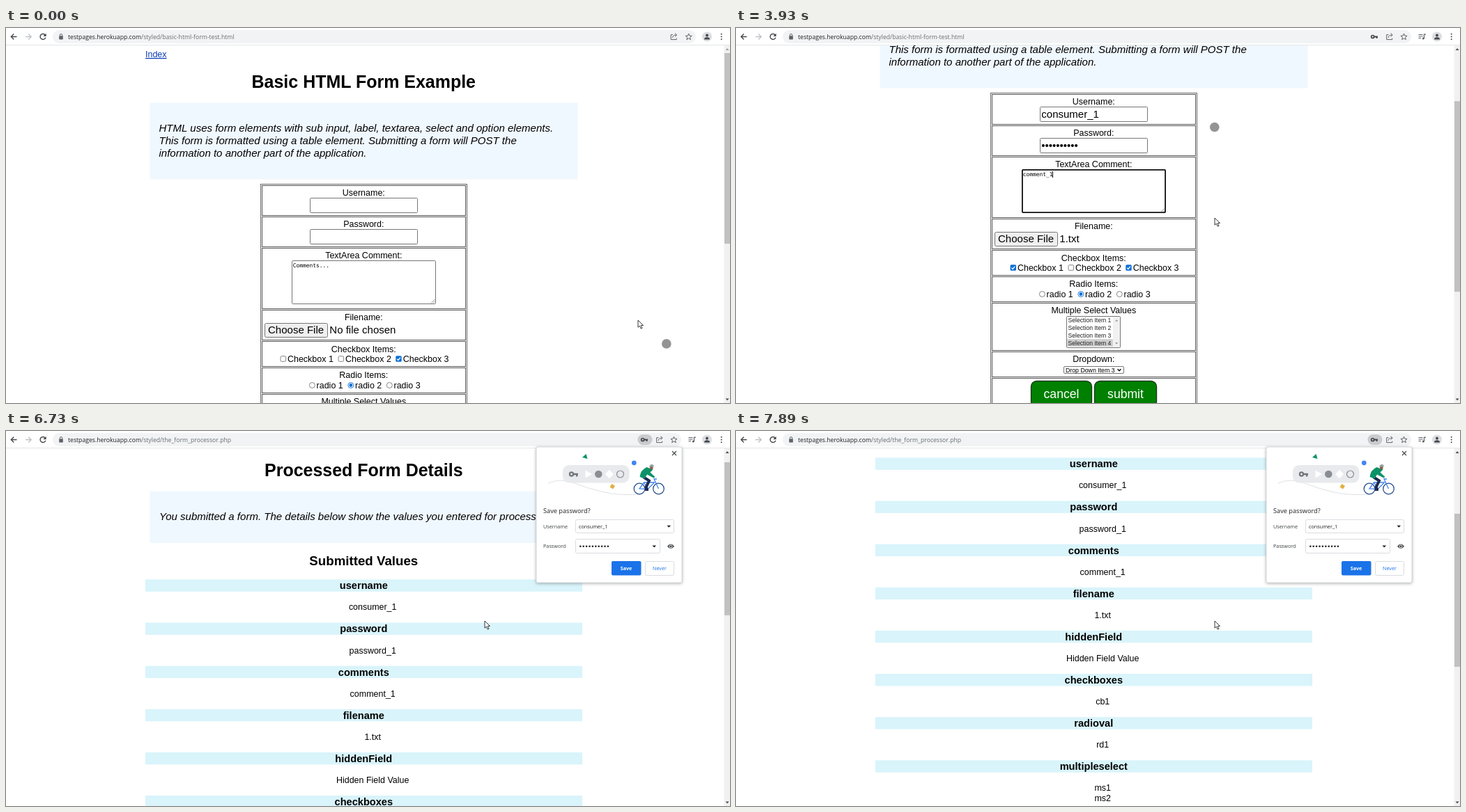
Animation, 1039 px wide and 539 px high, one loop 8 s. Source, as an HTML page:

```html
<!DOCTYPE html>
<html lang="en">
<head>
<meta charset="utf-8">
<title>Form demo</title>
<style>
  html, body { margin: 0; width: 100%; height: 100%; overflow: hidden; background: #fff; }
  svg { display: block; font-family: "Liberation Sans", Arial, sans-serif; }
  .ui { font-family: "Open Sans", "Noto Sans", sans-serif; }
  .mono { font-family: "DejaVu Sans Mono", monospace; }
  .b { font-weight: bold; }
  .i { font-style: italic; }
  .shadow { filter: drop-shadow(0 1px 2px rgba(0, 0, 0, .3)); }
</style>
</head>
<body>
<svg id="stage" width="1039" height="539" viewBox="0 0 1039 539"></svg>
<script>
const LOOP = 8000, NOTCH = 65.4, CHAR_MS = 97;
const NAME = 'consumer_1', COMMENT = 'comment_1';
const SMALL = 12.48, BIG = 15.02;
const stage = document.getElementById('stage');
const pen = document.createElement('canvas').getContext('2d');

const clamp = v => Math.max(0, Math.min(1, v));
const typed = (t, start) => Math.max(0, Math.floor((t - start) / CHAR_MS) + 1);

// Wheel notches already turned, each eased out, in whole pixels
const scrolled = (t, starts) => Math.round(
  NOTCH * starts.reduce((sum, s) => sum + 1 - (1 - clamp((t - s) / 170)) ** 3, 0));

function along(t, keys) {
  let i = 1;
  while (i < keys.length - 1 && t > keys[i][0]) i++;
  const [a, b] = [keys[i - 1], keys[i]], p = clamp((t - a[0]) / (b[0] - a[0]));
  return [1, 2].map(k => a[k] + (b[k] - a[k]) * p);
}

// --- shape helpers: text is placed by its vertical middle, on a whole-pixel baseline ---
const text = (s, x, mid, size, cls = '', fill = '#000', anchor = 'start', more = '') =>
  `<text x="${x}" y="${Math.round(mid + size * .36)}" font-size="${size}" class="${cls}" fill="${fill}" text-anchor="${anchor}" ${more}>${s}</text>`;
const centred = (s, x, mid, size, cls, fill) => text(s, x, mid, size, cls, fill, 'middle');
const rect = (x, y, x2, y2, fill, stroke = 'none', r = 0, w = 1) =>
  `<rect x="${x}" y="${y}" width="${x2 - x}" height="${y2 - y}" fill="${fill}" stroke="${stroke}" rx="${r}" stroke-width="${w}"/>`;
const dot = (x, y, r, fill, stroke = 'none', w = 1) =>
  `<circle cx="${x}" cy="${y}" r="${r}" fill="${fill}" stroke="${stroke}" stroke-width="${w}"/>`;
const path = (d, fill, stroke = 'none', w = 1) =>
  `<path d="${d}" fill="${fill}" stroke="${stroke}" stroke-width="${w}"/>`;
const line = (d, stroke, w = 1) => path(d, 'none', stroke, w);

function box(x, y, x2, y2, focus) {
  return focus ? rect(x + .4, y + .4, x2 - .4, y2 - .4, '#fff', '#101010', 1, 1.8)
    : rect(x, y, x2, y2, '#fff', '#767676', 1);
}
function caret(s, x, y, y2, font) {
  pen.font = font;
  const cx = Math.floor(x + pen.measureText(s).width) + .5;
  return line(`M${cx} ${y}V${y2}`, '#000');
}
function checkbox(n, x, on) {
  const mark = on ? rect(x - 4.2, 471.3, x + 4.2, 479.7, '#0b6fd8', 'none', 1.5) +
    line(`M${x - 2.4} 475.6l1.7 1.8 3.2-3.8`, '#fff', 1.3)
    : rect(x - 3.8, 471.7, x + 3.8, 479.3, '#fff', '#767676', 1.5, .9);
  return mark + text('Checkbox ' + n, x + 6.2, 475.5, SMALL);
}
function radio(n, x, on) {
  return dot(x, 513.5, 4, '#fff', on ? '#0b6fd8' : '#767676', .9) +
    (on ? dot(x, 513.5, 2.4, '#0b6fd8') : '') + text('radio ' + n, x + 6.2, 513.3, SMALL);
}
function button(s, x, x2) {
  return rect(x, 638.5, x2, 675.5, 'green', '#1c3a1c', 8, 1.4) + centred(s, (x + x2) / 2, 657, 17.6, '', '#fff');
}

const heading = s => text('Index', 200, 38, SMALL, '', '#0a3cb4', 'start', 'text-decoration="underline"') +
  centred(s, 513.3, 77, 24.97, 'b');

function formPage(t) {
  const focus = t < 270 ? '' : t < 1490 ? 'user' : t < 2610 ? 'pass' : 'comment';
  const user = NAME.slice(0, typed(t, 400));
  const pass = '•'.repeat(Math.min(10, typed(t, 1645)));
  const note = t < 2740 ? 'Comments...' : COMMENT.slice(0, typed(t, 2944));
  const blinkOn = t < 3740 || Math.floor((t - 3740) / 530) % 2 === 0;
  const big = BIG + 'px "Liberation Sans"';
  let s = heading('Basic HTML Form Example') + rect(206.5, 107.5, 820.5, 217.5, '#f0f8ff');
  ['HTML uses form elements with sub input, label, textarea, select and option elements.',
   'This form is formatted using a table element. Submitting a form will POST the',
   'information to another part of the application.']
    .forEach((l, i) => s += text(l, 219.5, 144 + i * 17.7, BIG, 'i'));

  s += rect(365.5, 224.5, 661.5, 682.5, '#fff', '#666');
  const tops = [226.5, 271.5, 316.5, 405.5, 450.5, 488.5, 526.5, 596.5, 634.5, 682.5];
  tops.slice(0, 9).forEach((y, i) => s += rect(367.5, y, 659.5, tops[i + 1] - 2, '#fff', '#555'));
  [['Username:', 236.6], ['Password:', 281.6], ['TextArea Comment:', 326.8], ['Filename:', 416],
   ['Checkbox Items:', 461.2], ['Radio Items:', 499], ['Multiple Select Values', 537], ['Dropdown:', 607]]
    .forEach(([l, y]) => s += centred(l, 513.3, y, SMALL));

  s += box(436.5, 244.5, 590.5, 265.5, focus === 'user') + text(user, 438.3, 254.5, BIG);
  s += box(436.5, 289.5, 590.5, 310.5, focus === 'pass') + text(pass, 438.3, 299.5, BIG);
  s += box(410.5, 334.5, 616.5, 396.5, focus === 'comment') + text(note, 411.8, 341.5, 7.9, 'mono');
  s += line('M610 395.5l5.5-5.5M613 395.5l2.5-2.5', '#777', .8);
  if (focus === 'user') s += caret(user, 438.3, 247, 264, big);
  if (focus === 'pass') s += caret(pass, 438.3, 292, 309, big);
  if (focus === 'comment' && blinkOn) s += caret(t < 2740 ? '' : note, 411.8, 337, 346, '7.9px "DejaVu Sans Mono"');

  s += rect(371.5, 424.5, 461.5, 444.5, '#efefef', '#767676', 2) + text('Choose File', 376, 434, BIG);
  s += text(t < 3850 ? 'No file chosen' : '1.txt', 464.3, 434, BIG);
  s += checkbox(1, 397.8, t >= 3920) + checkbox(2, 480.8, false) + checkbox(3, 563.5, true);
  const pick = t < 4590 ? 2 : 1;
  [439.4, 494.9, 550.3].forEach((x, i) => s += radio(i + 1, x, pick === i + 1));

  s += rect(474.5, 545.5, 551.5, 590.5, '#fff', '#767676', 1) + rect(541, 546, 551, 590, '#f1f1f1');
  const chosen = t < 4790 ? [4] : t < 4990 ? [1] : [1, 2];
  for (let n = 1; n <= 4; n++) {
    const y = 539.4 + n * 11.05;
    if (chosen.includes(n)) s += rect(475.3, y - 5.4, 540.8, y + 5.4, '#cecece');
    s += text('Selection Item ' + n, 476.5, y, 8.65, '', '#222');
  }
  s += path('M544 552.5h4.4l-2.2-2.6zM544 583h4.4l-2.2 2.6z', '#999');
  s += rect(470.5, 617.5, 556.5, 627.5, '#fff', '#767676', 1.5);
  s += text('Drop Down Item ' + (t < 5260 ? 3 : 1), 473, 622.4, 8.75) + line('M547.6 621.3l2.4 2.5 2.4-2.5', '#000', 1.3);
  return s + button('cancel', 423.5, 510.5) + button('submit', 514.5, 603.5);
}

function resultPage() {
  let s = heading('Processed Form Details') + rect(206.5, 107.5, 820.5, 182, '#f0f8ff');
  s += text('You submitted a form. The details below show the values you entered for processing.', 220, 144, BIG, 'i');
  s += centred('Submitted Values', 513.3, 207.7, 18.72, 'b');
  [['username', NAME], ['password', 'password_1'], ['comments', COMMENT], ['filename', '1.txt'],
   ['hiddenField', 'Hidden Field Value'], ['checkboxes', 'cb1'], ['radioval', 'rd1'], ['multipleselect', 'ms1', 'ms2']]
    .forEach(([key, ...values], i) => {
      const y = 243.1 + i * 62.13;
      s += rect(200, y - 8.7, 827, y + 8.7, '#d9f4fb') + centred(key, 513.3, y, 14.6, 'b');
      values.forEach((v, k) => s += centred(v, 526.2, y + 30.9 + k * 14.3, SMALL));
    });
  return s;
}

function scrollbar(top, height, atTop) {
  return rect(1030.5, 25, 1039, 539, '#f1f1f1') + rect(1031, top, 1039, top + height, '#c1c1c1') +
    path('M1032.6 32h5l-2.5-3z', atTop ? '#a3a3a3' : '#505050') + path('M1032.6 532.5h5l-2.5 3z', '#505050');
}

const keyIcon = (x, y, k, c) => `<g transform="translate(${x} ${y}) scale(${k})">` +
  dot(-2.3, 0, 2, 'none', c, 1.7) + line('M0 0h5M3.6 0v2.6', c, 1.8) + '</g>';

function star(x, y) {
  let d = '';
  for (let i = 0; i < 10; i++) {
    const r = i % 2 ? 2.1 : 4.8, a = i * Math.PI / 5;
    d += `${i ? 'L' : 'M'}${(x + r * Math.sin(a)).toFixed(2)} ${(y - r * Math.cos(a)).toFixed(2)}`;
  }
  return line(d + 'z', '#5f6368', 1);
}

function toolbar(t) {
  const grey = '#5f6368', wide = t < 1130, x = wide ? 958.5 : 938;
  let s = rect(0, 0, 1039, 25, '#fff') + rect(0, 24, 1039, 25, '#e4e6e8');
  s += rect(67, 3, wide ? 990 : 969, 22, '#f1f3f4', 'none', 9.5);
  s += line('M15.5 12.5H7.5M11.3 8.5l-4 4 4 4', '#44474b', 1.3) + line('M28 12.5h8M32.2 8.5l4 4-4 4', '#bdc1c6', 1.3);
  s += t >= 5520 && t < 5870 ? line('M49.5 9l7 7M56.5 9l-7 7', '#44474b', 1.4)
    : line('M56 9.7a4 4 0 1 0 .9 3.9', '#44474b', 1.4) + path('M57.6 7.8v4.3h-4.3z', '#44474b');
  s += rect(76.2, 11.2, 81.8, 16.4, grey, 'none', .6) + line('M77.3 11.5v-1.3a1.7 1.7 0 0 1 3.4 0v1.3', grey, 1);
  const file = t < 5730 ? 'basic-html-form-test.html' : 'the_form_processor.php';
  s += text(`testpages.herokuapp.com<tspan fill="#6a6e73">/styled/${file}</tspan>`, 89, 12.5, 8.67, 'ui', '#202124');
  if (t >= 5930) s += rect(906.5, 5, 927.5, 20, '#c9cbce', 'none', 7.5);
  if (t >= 1645) s += keyIcon(916, 12.5, 1, '#44474b');
  s += line(`M${x - 1.5} 9.6h-2.8v7h8v-2`, grey, 1) + line(`M${x - 2} 14q.5-4 5.5-4M${x + 1.5} 7.5l2.7 2.5-2.7 2.5`, grey, 1);
  s += star(wide ? 979.7 : 958.5, 12.8);
  if (!wide) s += line('M979.5 9.5h6M979.5 12h6M979.5 14.5h3.5M987.5 15V9.2h2.5', grey, 1.2) + dot(986.3, 15, 1.5, grey);
  s += dot(1006, 12.5, 7, '#dcdee1') + dot(1006, 10.4, 2, '#44474b') + path('M1002 16.5q0-3.2 4-3.2t4 3.2z', '#44474b');
  return s + [8.8, 12.5, 16.2].map(y => dot(1026.7, y, 1, '#44474b')).join('');
}

function cyclist() {
  return dot(909, 83, 7.8, 'none', '#2b4f8f', 1.3) + dot(936.5, 83, 7.8, 'none', '#2b4f8f', 1.3) +
    line('M909 83l6.5-9h15l-9.5 9.5zM915.5 74l5.5 9.5M936.5 83l-6.5-14h4', '#4285f4', 1.3) +
    line('M914.5 66l8.5 5.5-4 8.5v4h3', '#1d2b4f', 4) +
    path('M909.5 66q1-10 10-14l9 3.5-4 4 7 6.5-2 1.5-9.5-5-3.5 6z', '#0d9268') +
    dot(926.3, 53, 2.4, '#8d5b45') + path('M923 51.5q1-4 4.5-3.5 3 1 2 3.5z', '#9aa0a6');
}

function popup(t) {
  const c = '#dadce0', ink = '#3c4043';
  let s = `<g opacity="${clamp((t - 5900) / 170)}">` +
    `<g class="shadow">${rect(761, 23, 970, 218, '#fff', '#cfd1d4', 2, .8)}</g>`;
  s += line('M956 29l6 6M962 29l-6 6', '#44474b', 1.2);
  s += line('M778 75q18-8 38 0t42 13 52 3', '#dfe1e5', 1) + rect(799, 49, 894.5, 74.5, '#e8eaed', 'none', 9);
  s += keyIcon(814.5, 62, 1.3, '#70757a') + path('M831.5 56.5v11l9.5-5.5z', '#fff') + dot(850.3, 62, 5.3, '#8a8e93');
  s += path('M866 55.8l6 6.2-6 6.2-6-6.2z', '#fff') + dot(881.5, 62, 5, 'none', '#8a8e93', 1.2);
  s += path('M827 38l5.5-5 2 7z', '#0d9268') + dot(901.3, 45.8, 3.4, '#4285f4') + path('M869.5 76l4.5 3-3 4.5-4.5-3z', '#e0b040');
  s += cyclist() + text('Save password?', 771, 115, 9.2, 'ui', '#202124');
  s += text('Username', 771, 137, 7.24, 'ui', ink) + text('Password', 771, 165.5, 7.24, 'ui', ink);
  s += rect(817.5, 127.5, 958.5, 146.5, '#fff', c, 2) + rect(817.5, 155.5, 938.5, 175.5, '#fff', c, 2);
  s += text(NAME, 822, 137, 7.24, 'ui', '#202124') + path('M948.5 135.8h5.6l-2.8 3zM927.5 164.5h5.6l-2.8 3z', '#202124');
  for (let i = 0; i < 10; i++) s += dot(824.3 + i * 4.4, 165.7, 1.3, '#202124');
  s += path('M949 165.8q5-6.6 10 0-5 6.6-10 0z', '#44474b') + dot(954, 165.8, 2, '#44474b', '#fff', .9);
  s += rect(869, 187, 911.5, 207.5, '#1a73e8', 'none', 2) + centred('Save', 890, 197, 7.2, 'ui b', '#fff');
  return s + rect(917.5, 187.5, 958.5, 207.5, '#fff', c, 2) + centred('Never', 938, 197, 7.2, 'ui', '#1a73e8') + '</g>';
}

const pointer = ([x, y]) =>
  path(`M${x} ${y}v10.2l2.4-2.1 1.8 4 1.8-.8-1.8-3.9h3.3z`, '#fff', '#222', .9);

function draw(t) {
  const result = t >= 5730;
  const scroll = scrolled(t, result ? [6710, 7280, 7660] : [2740, 3200, 4240]);
  const tip = along(t, [[0, 907, 420], [200, 912, 427], [1450, 912, 427], [1800, 693, 278], [1980, 687, 273]]);
  const spot = result ? [0, 25]
    : along(t, [[0, 948, 454], [270, 912, 427], [1500, 912, 427], [1850, 694, 279], [2000, 686.8, 273.5]]);
  let s = `<g transform="translate(0 ${-scroll})">` + (result ? resultPage() : formPage(t));
  if (!result || t >= 5800) s += dot(...spot, 6.8, '#949494');
  s += '</g>' + scrollbar(36 + scroll * (result ? .423 : .528), result ? 220 : 274, scroll < 1);
  s += toolbar(t);
  if (t > 5900) s += popup(t);
  return s + pointer(tip);
}

let shown = '';
function tick() {
  const next = draw(performance.now() % LOOP);
  if (next !== shown) stage.innerHTML = shown = next;
  requestAnimationFrame(tick);
}
tick();
</script>
</body>
</html>
```
